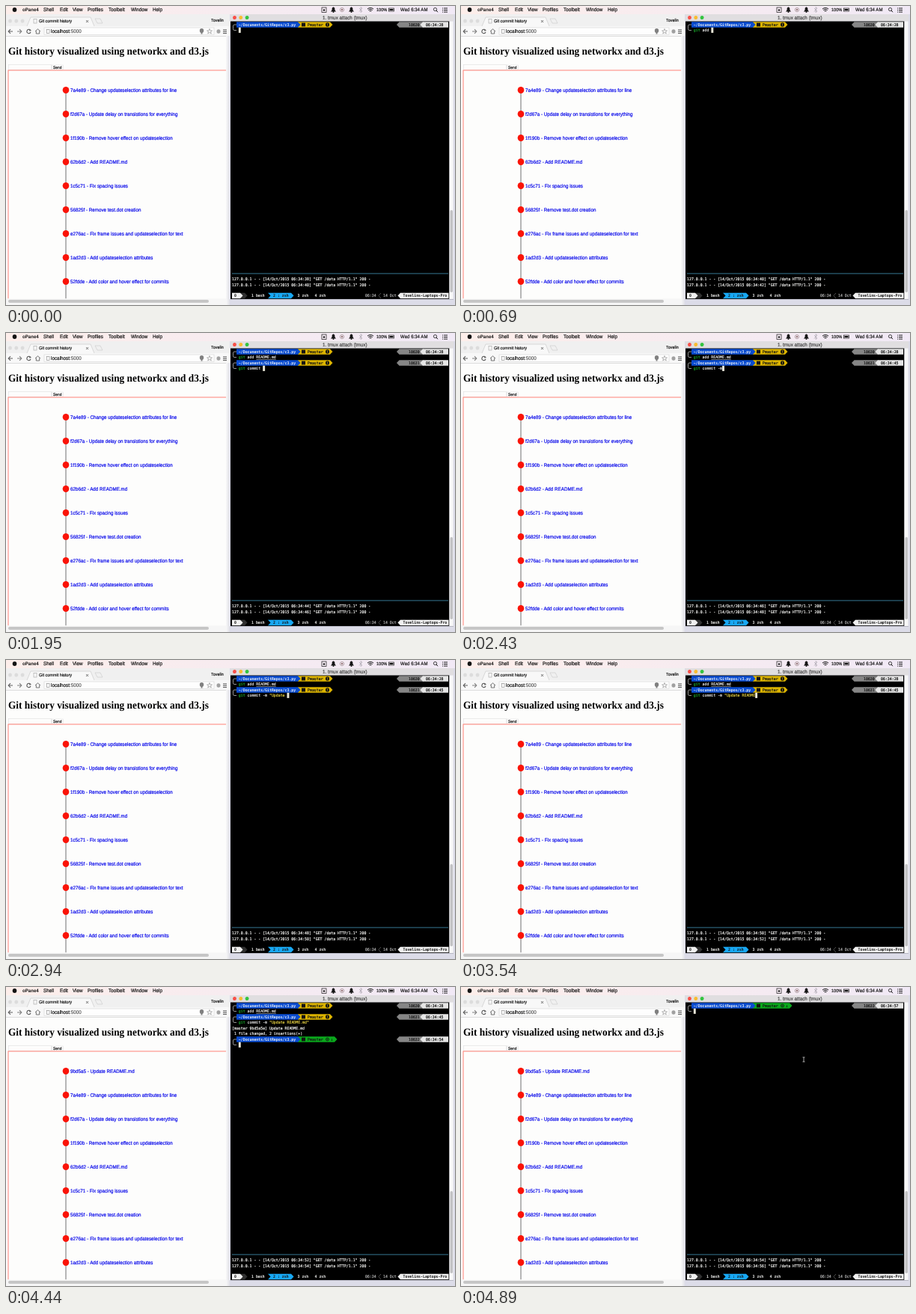
Recreate the animation shown at these times as an HTML page with a canvas. Size 600 by 400 pixels, loop 4920 ms.

```html
<!DOCTYPE html>
<html lang="en">
<head>
<meta charset="utf-8">
<title>Git commit history</title>
<style>
html, body { margin: 0; width: 100%; height: 100%; overflow: hidden; background: #fdfdfc; }
canvas { display: block; width: 600px; height: 400px; }
</style>
</head>
<body>
<canvas id="stage" width="600" height="400"></canvas>
<script>
const ctx = document.getElementById('stage').getContext('2d');
const LOOP = 4.92;
const SANS = '"Liberation Sans", Arial, sans-serif';
const SERIF = '"Liberation Serif", serif';
const MONO = '"DejaVu Sans Mono", monospace';
const CELL = 2.94, LINE = 7.5, LEFT = 302;
const ASPECT = 15 / 16; // a 16:10 screen shown on a 3:2 stage
const LIGHT = '#f4f4f2', INK = '#141414', PAGE = '#fdfdfc';

// Moments of the session, in seconds of playback
const ADD_DONE = 1.25, COMMIT_DONE = 3.93, CLEARED = 4.83;
const SHIFT_START = 4.08, SHIFT_END = 4.3;

const ADD = [[0.25, 1.1, 'git add README.md']];
const COMMIT = [[1.5, 1.93, 'git commit '], [2.3, 2.9, '-m "Update '], [2.97, 3.8, 'README.md"']];
const CLEAR = [[4.6, 4.78, 'clear']];

const COMMITS = [
  '7a4e89 - Change updateselection attributes for line',
  'f2d67a - Update delay on transistions for everything',
  '1f190b - Remove hover effect on updateselection',
  '62b6d2 - Add README.md',
  '1c5c71 - Fix spacing issues',
  '56825f - Remove test.dot creation',
  'e276ac - Fix frame issues and updateselection for text',
  '1ad2d3 - Add updateselection attributes',
  '52fdde - Add color and hover effect for commits'
];

const clamp = v => Math.max(0, Math.min(1, v));
const cubicInOut = p => p < 0.5 ? 4 * p ** 3 : 1 - 4 * (1 - p) ** 3;
const clockSecond = t => 40.8 + 3.36 * t;
const typed = (pieces, t) => pieces.map(([from, to, s]) =>
  s.slice(0, Math.floor(clamp((t - from) / (to - from)) * s.length + 1e-6))).join('');

// Laid out ten times larger and scaled down, so small type keeps exact advances.
// The thin outline gives the slightly heavier strokes of smoothed screen type.
function text(s, x, y, size, color = INK, family = SANS, weight = 'normal') {
  ctx.save();
  ctx.translate(x, y + size * 0.36 / ASPECT);
  ctx.scale(0.1, 0.1 / ASPECT);
  ctx.font = `${weight} ${size * 10}px ${family}`;
  ctx.textRendering = 'geometricPrecision';
  ctx.fillStyle = ctx.strokeStyle = color;
  ctx.lineWidth = 1.8;
  ctx.lineJoin = 'round';
  ctx.fillText(s, 0, 0);
  if (weight === 'normal') ctx.strokeText(s, 0, 0);
  ctx.restore();
}
const mono = (s, x, y, color = LIGHT, weight) => text(s, x, y, CELL / 0.602, color, MONO, weight);

function rect(x, y, w, h, color) {
  ctx.fillStyle = color;
  ctx.fillRect(x, y, w, h);
}
function pill(x, y, w, h, color) {
  ctx.fillStyle = color;
  ctx.beginPath();
  ctx.roundRect(x, y, w, h, Math.min(w, h) / 2);
  ctx.fill();
}
function fade(x, y, w, h, from, to) {
  const gradient = ctx.createLinearGradient(x, 0, x + w, 0);
  gradient.addColorStop(0, from);
  gradient.addColorStop(1, to);
  rect(x, y, w, h, gradient);
}
function frame(x, y, w, h, color, width = 0.7) {
  ctx.strokeStyle = color;
  ctx.lineWidth = width;
  ctx.strokeRect(x, y, w, h);
}
function disc(x, y, r, color) {
  ctx.fillStyle = color;
  ctx.beginPath();
  ctx.ellipse(x, y, r, r / ASPECT, 0, 0, Math.PI * 2);
  ctx.fill();
}
function ring(x, y, r, color, from = 0, to = Math.PI * 2, width = 0.8) {
  ctx.strokeStyle = color;
  ctx.lineWidth = width;
  ctx.beginPath();
  ctx.arc(x, y, r, from, to);
  ctx.stroke();
}
function shape(points, color) {
  ctx.fillStyle = color;
  ctx.beginPath();
  points.forEach(([x, y]) => ctx.lineTo(x, y));
  ctx.fill();
}
function path(d, color, width = 0.8) {
  ctx.strokeStyle = color;
  ctx.lineWidth = width;
  ctx.stroke(new Path2D(d));
}

// Status segments with an arrow on the right or on the left end
function segmentRight(x, end, y, color) {
  shape([[x, y - 3.75], [end, y - 3.75], [end + 3.5, y], [end, y + 3.75], [x, y + 3.75]], color);
}
function segmentLeft(x, end, y, color) {
  shape([[x, y], [x + 3.5, y - 3.75], [end, y - 3.75], [end, y + 3.75], [x + 3.5, y + 3.75]], color);
}

function trafficLights(x, y, colors) {
  colors.forEach((color, i) => disc(x + i * 8.3, y, 2.4, color));
}

function bell(x, color) {
  shape([[x - 3.5, 7.5], [x - 2, 5.5], [x - 1.7, 2.5], [x, 1.2], [x + 1.7, 2.5], [x + 2, 5.5], [x + 3.5, 7.5]], color);
  disc(x, 8, 1, color);
}

function drawMenuBar() {
  fade(0, 0, 600, 11, '#fdeeea', '#f1e9f6');
  disc(11.5, 5, 2.8, INK);
  text('oPane4', 22, 4.8, 6.1, INK, SANS, 'bold');
  [['Shell', 50], ['Edit', 72], ['View', 89], ['Profiles', 109],
   ['Toolbelt', 137], ['Window', 167], ['Help', 196]].forEach(([s, x]) => text(s, x, 4.8, 6.3));
  frame(422, 2, 6, 6.5, INK);
  disc(425, 5.5, 1.2, INK);
  bell(437.5, INK);
  ring(449, 5, 2.6, '#a08c90');
  disc(449, 5, 1, '#704848');
  bell(461.5, INK);
  path('M472 7.5L476 3L474 1.5V8.5L476 7L472 3', '#a09aa4', 0.6);
  [2, 4, 6].forEach(r => ring(487, 8.5, r, INK, -2.3, -0.84, 1));
  text('100%', 495, 4.8, 5.6);
  frame(511.5, 3, 7, 4, INK);
  rect(512.5, 4, 5, 2, INK);
  text('Wed 6:34 AM', 527, 4.8, 6.1);
  ring(573.5, 4.5, 2.1, INK);
  path('M575 6L577 8.2', INK, 1);
  [2.5, 5, 7.5].forEach(y => {
    rect(583, y, 1, 1, INK);
    rect(585, y, 5, 1, INK);
  });
}

function drawBrowser(t) {
  rect(0, 11, 300, 389, PAGE);
  rect(0, 11, 299, 16, '#f0f0f0');
  trafficLights(5.5, 20, ['#dcdcdc', '#dcdcdc', '#dcdcdc']);
  rect(0, 27, 299, 13, '#f8f8f8');
  shape([[28, 27], [33, 15], [113, 15], [118, 27]], '#f8f8f8');
  path('M28 27L33 15H113L118 27', '#c4c4c4', 0.6);
  path('M119 17H126L129 23H122Z', '#c8c8c8', 0.6);
  frame(37, 17.5, 4, 5.5, '#a0a0a0', 0.6);
  text('Git commit history', 44, 20.3, 5.5);
  path('M107 19L110 22M110 19L107 22', '#505050');
  text('Tovelin', 274, 19.3, 5.4);

  path('M9 34H3.5M6 31.2L3.2 34L6 36.8', '#606060', 1.1);
  path('M15 34H20.5M18 31.2L20.8 34L18 36.8', '#808080', 1.1);
  ring(30.5, 34, 2.6, '#606060', 0.3, 5.4, 1.1);
  shape([[31.5, 30.5], [34, 33], [31, 33.5]], '#606060');
  path('M39 34L42.5 30.8L46 34M40.3 33.5V37H44.7V33.5', '#606060', 0.9);
  rect(51, 29, 227, 9.5, '#fefefe');
  frame(51, 29, 227, 9.5, '#d2d2d2', 0.6);
  frame(54.5, 31.5, 3.5, 5, '#808080', 0.6);
  text('localhost', 60, 33.8, 6.35);
  text(':5000', 85, 33.8, 6.35, '#606060');
  disc(261.5, 33, 2.7, '#808080');
  rect(260.5, 35, 2, 2.5, '#808080');
  path('M272 30.5L273 33H275.5L273.5 34.5L274.3 37L272 35.5L269.7 37L270.5 34.5L268.5 33H271Z', '#808080', 0.6);
  disc(284, 34, 2.5, '#a0a0a0');
  [31.5, 33.8, 36.1].forEach(y => rect(290, y, 5, 1, '#505050'));
  rect(0, 40, 299, 0.7, '#d0d0d0');

  text('Git history visualized using networkx and d3.js', 3, 59.5, 13.34, '#000', SERIF, 'bold');
  frame(3.5, 78.5, 57, 7, '#e0e0e0', 0.6);
  rect(61.5, 79, 15, 6, '#fefefe');
  frame(61.5, 79, 15, 6, '#dcdcdc', 0.5);
  text('Send', 63, 82, 4.9);

  drawHistory(t);

  rect(0, 391.5, 299, 8.5, '#f6f6f6');
  pill(3, 393, 268, 4, '#c6c6c6');
  fade(294, 40, 6, 360, '#f8f8f8', '#dcdce4');
}

function drawHistory(t) {
  const p = cubicInOut(clamp((t - SHIFT_START) / (SHIFT_END - SHIFT_START)));
  const rowY = row => 112.5 + 32 * row;
  const node = (label, row) => {
    disc(80, rowY(row), 4.3, '#fa1408');
    text(label, 86, rowY(row) - 0.2, 6.27, '#0808ea');
  };
  ctx.save();
  ctx.beginPath();
  ctx.rect(0, 80, 295, 311.5);
  ctx.clip();
  frame(3, 86, 400, 400, '#ff7468', 0.9);
  rect(79.5, 112, 1, 290, '#707070');
  // New data swaps two labels at once; positions follow in a transition
  COMMITS.forEach((label, row) => {
    const swapped = t >= COMMIT_DONE && (row === 2 || row === 4);
    const from = swapped ? 6 - row : row;
    node(label, from + (row + 1 - from) * p);
  });
  ctx.globalAlpha = p;
  if (p > 0) node('9bd5a5 - Update README.md', 0);
  ctx.restore();
}

function drawPrompt(y, number, second, clean) {
  path(`M308 ${y}H305Q303.5 ${y} 303.5 ${y + 2}V${y + 5.5}Q303.5 ${y + 7.5} 305 ${y + 7.5}H308`, '#d0d0d0', 0.7);
  segmentRight(390, clean ? 439 : 433, y, clean ? '#0aa81c' : '#dcb400');
  segmentRight(308, 390, y, '#0a4cd0');
  mono('~/Documents/GitRepos/c3.py', LEFT + 3 * CELL, y, '#e6ecf6', 'bold');
  rect(395, y - 2.4, 5, 4.8, INK);
  mono('Pmaster', 403, y, INK);
  if (clean) {
    ring(429.5, y, 2, INK);
    disc(429.5, y, 0.8, INK);
    mono('↓', 434, y, INK);
  } else {
    disc(429.5, y, 2.5, INK);
    mono('!', 428, y, '#dcb400', 'bold');
  }
  segmentLeft(522, 558, y, '#868686');
  segmentLeft(553.5, 591, y, '#e6e6e6');
  mono(String(number), 538, y, INK);
  mono('06:34:' + second, 561, y, INK);
}

function drawCommand(y, command, active) {
  const x = LEFT + 3 * CELL;
  const quote = command.includes('"') ? command.indexOf('"') : command.length;
  mono(command.slice(0, 3), x, y, '#18a028');
  mono(command.slice(3, quote), x + 3 * CELL, y, '#e0e0e0');
  mono(command.slice(quote), x + quote * CELL, y, '#e0cc40');
  if (command === ADD[0][2]) rect(x + 8 * CELL, y + 2.7, 9 * CELL, 0.5, '#e0e0e0');
  if (active) rect(x + command.length * CELL, y - 3.8, CELL, 7.2, '#e8e6d8');
}

function drawSession(t) {
  const y = row => 25 + row * LINE;
  if (t >= CLEARED) {
    drawPrompt(y(0), 10633, 57, true);
    drawCommand(y(1), '', true);
    return;
  }
  drawPrompt(y(0), 10630, 28, false);
  drawCommand(y(1), typed(ADD, t), t < ADD_DONE);
  if (t < ADD_DONE) return;
  drawPrompt(y(2), 10631, 45, false);
  drawCommand(y(3), typed(COMMIT, t), t < COMMIT_DONE);
  if (t < COMMIT_DONE) return;
  mono('[master 9bd5a5e] Update README.md', LEFT, y(4));
  mono(' 1 file changed, 2 insertions(+)', LEFT, y(5));
  drawPrompt(y(6), 10632, 54, true);
  drawCommand(y(7), typed(CLEAR, t), true);
}

function drawServerLog(t) {
  rect(302, 357.5, 289, 0.9, '#3c86a4');
  const latest = 2 * Math.floor(clockSecond(t) / 2);
  [latest - 2, latest].forEach((second, i) =>
    mono(`127.0.0.1 - - [14/Oct/2015 06:34:${second}] "GET /data HTTP/1.1" 200 -`, LEFT, 365.2 + i * LINE));
}

function drawStatusBar() {
  const y = 387.5;
  segmentRight(314, 319, y, '#303030');
  segmentRight(302, 313, y, '#f0f0f0');
  mono('0', 305, y, INK, 'bold');
  mono('1 bash', 328, y, LIGHT, 'bold');
  segmentRight(350, 381, y, '#18a8f4');
  shape([[350, y - 3.75], [353.5, y], [350, y + 3.75]], '#000');
  mono('2 : zsh', 357, y, INK, 'bold');
  mono('3 zsh', 389.5, y, LIGHT, 'bold');
  mono('4 zsh', 412.5, y, LIGHT, 'bold');
  mono('06:34', 480, y, '#b0b0b0');
  path('M501 384L498 387.5L501 391', '#808080', 0.6);
  mono('14 Oct', 504, y, '#b0b0b0');
  segmentLeft(523.5, 591.5, y, '#f0f0f0');
  mono('Tovelins-Laptops-Pro', 530.5, y, INK, 'bold');
}

function drawTerminal(t) {
  rect(299, 11, 301, 389, '#dcdce8');
  rect(300, 11, 298, 9.5, '#e0dee0');
  trafficLights(305.5, 15.5, ['#f85048', '#f8bc30', '#34c440']);
  text('1. tmux attach (tmux)', 423, 15.4, 6.35, '#404040');
  rect(300, 20.5, 292.5, 371.5, '#000');
  rect(592.5, 20.5, 5, 371.5, '#f8f8f8');
  pill(593.5, 273, 3.5, 110, '#c2c2c4');
  rect(300, 392, 298, 1, '#b8b8c4');
  drawSession(t);
  drawServerLog(t);
  drawStatusBar();
  if (t >= 4.875) path('M456.5 94H459.5M458 94V100M456.5 100H459.5', '#d0d0d0', 0.8);
}

function draw(now) {
  const t = (now / 1000) % LOOP;
  drawBrowser(t);
  drawTerminal(t);
  drawMenuBar();
  requestAnimationFrame(draw);
}
requestAnimationFrame(draw);
</script>
</body>
</html>
```
